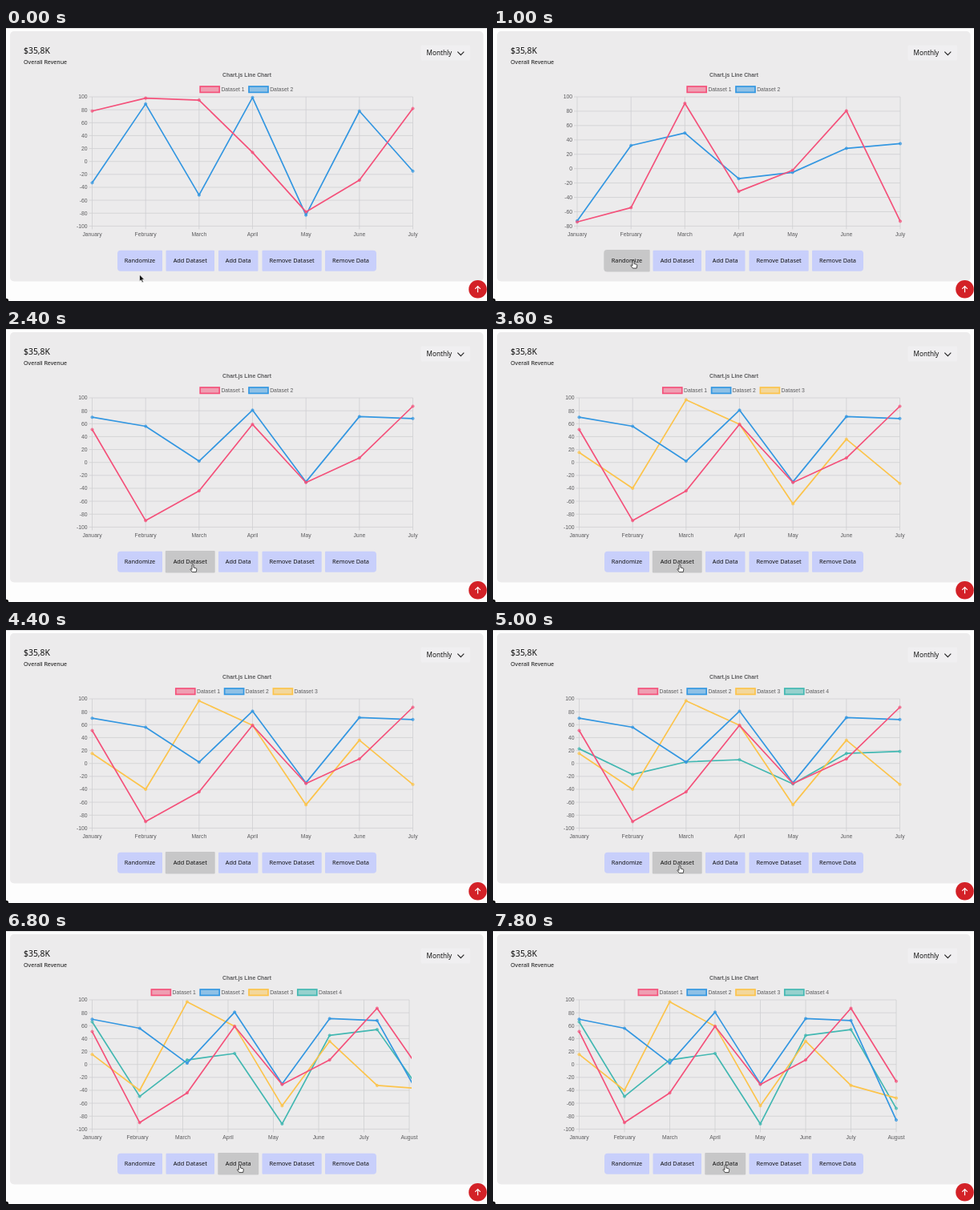
An HTML page for the animation above (8000 ms loop, 600 by 341 pixels).

```html
<!DOCTYPE html>
<html lang="en">
<head>
<meta charset="utf-8">
<title>Line chart</title>
<style>
  html, body { margin: 0; width: 100%; height: 100%; overflow: hidden; background: #fdfdfd; }
  svg { display: block; width: 100vw; height: 100vh; }
  .ui { font-family: "Noto Sans", "Open Sans", sans-serif; font-weight: 500; fill: #111; }
  .chart { font: 6.8px "Liberation Sans", Arial, sans-serif; fill: #5c5c5e; }
  .grid { stroke: #d0d0d2; stroke-width: .8; fill: none; }
  .buttons { font-size: 7.35px; text-anchor: middle; }
</style>
</head>
<body>
<svg viewBox="0 0 600 341">
  <clipPath id="area"><rect id="areaRect" y="83" height="167"/></clipPath>
  <rect width="600" height="341" fill="#fdfdfd"/>
  <rect width="600" height="1" fill="#dededf"/>
  <rect x="5" y="4" width="590.5" height="312.5" rx="5" fill="#ecebec"/>
  <g class="ui">
    <text x="22" y="32" font-size="10.4">$35,8K</text>
    <text x="22" y="45" font-size="7.1">Overall Revenue</text>
    <rect x="517.5" y="21.5" width="61.5" height="19" rx="2" fill="#f0eff1"/>
    <text x="524.5" y="34" font-size="8.2">Monthly</text>
    <path d="M563.3 29.6l4 4 4-4" fill="none" stroke="#222" stroke-width="1.1"/>
  </g>
  <g class="chart">
    <text x="300.5" y="60.5" font-weight="bold" text-anchor="middle">Chart.js Line Chart</text>
    <g id="chart"></g>
  </g>
  <g id="buttons" class="ui buttons"></g>
  <circle cx="588.5" cy="326.3" r="11.3" fill="#d32127"/>
  <path d="M588.5 330.3v-7.6M585.2 325.8l3.3-3.3 3.3 3.3" fill="none" stroke="#fff" stroke-width="1.2"/>
  <circle cx="0" cy="341" r="3.2" fill="#111"/>
  <g id="cursor" stroke-linejoin="round">
    <path id="arrow" d="M0 0V8.6L2 6.8 3.4 9.9 4.9 9.2 3.6 6.2H6.2Z" fill="#111" stroke="#fff" stroke-width=".7"/>
    <path id="hand" d="M-1 1a1 1 0 0 1 2 0V4l3 .8q1 .3 .8 1.4L4.2 9.6H-.6L-3.2 6.2Q-2.9 5-1 6.3Z" fill="#fff" stroke="#222" stroke-width=".8"/>
  </g>
</svg>
<script>
const LOOP = 8000, STEP = 200, TOP = 86, BOTTOM = 247.4;
const MONTHS = ["January", "February", "March", "April", "May", "June", "July", "August"];
const COLORS = ["#f4527b", "#3497e1", "#fcc44c", "#43b8b2"];
const $ = id => document.getElementById(id);

const pink = [51, -90, -44, 59, -31, 7, 87], blue = [70, 56, 2, 81, -30, 71, 68];
const yellow = [15.5, -40, 97, 59, -64, 36, -32.5], teal = [66, -49.5, 7, 17, -92, 45, 54];
const wide = { left: 107.5, right: 507.5, min: -100 };
const scenes = [
  { at: -LOOP, ...wide, sets: [[78, 98, 95, 14, -78, -29, 82], [-33, 89, -52, 99, -83, 78, -15]] },
  { at: 260, left: 105, right: 508, min: -80,
    sets: [[-75, -55, 91, -32, -2, 81, -74], [-73, 32, 50, -14.5, -5, 28, 35]] },
  { at: 1380, ...wide, sets: [pink, blue] },
  { at: 2560, ...wide, sets: [pink, blue, yellow] },
  { at: 4900, ...wide, sets: [pink, blue, yellow, teal] },
  { at: 6520, ...wide, right: 503,
    sets: [[...pink, -26], [...blue, -86], [...yellow, -52], [...teal, -68]] }
];

// time, x, y of the pointer tip
const track = [[0, 166.5, 308], [200, 171, 299], [400, 175, 290.5], [1700, 175, 290.5],
  [2200, 233, 294], [5000, 233, 294], [5600, 291, 292], [6800, 291.5, 292], [7800, 290, 292]];
const buttons = [["Randomize", 139, 195], ["Add Dataset", 199.5, 260], ["Add Data", 265, 314.5],
  ["Remove Dataset", 319.5, 393.7], ["Remove Data", 398, 462]];

const easeOutQuart = t => 1 - (1 - t) ** 4;
const mix = (a, b, t) => a + (b - a) * t;
const xAt = (s, i) => s.left + i * (s.right - s.left) / (s.sets[0].length - 1);
const yAt = (s, v) => TOP + (100 - v) * (BOTTOM - TOP) / (100 - s.min);

function pointAt(now, before, set, i, t) {
  const x = xAt(now, i), y = yAt(now, now.sets[set][i]);
  const old = before.sets[set];
  // new points rise from the zero line
  const fromX = old ? xAt(before, i) : x;
  const fromY = yAt(before, old?.[i] ?? 0);
  return [mix(fromX, x, t), mix(fromY, y, t)];
}

function drawGrid(s) {
  let lines = "", labels = "";
  for (let v = s.min; v <= 100; v += 20) {
    const y = yAt(s, v);
    lines += `M${s.left - 4} ${y}H${s.right}`;
    labels += `<text x="${s.left - 6}" y="${y + 2.4}" text-anchor="end">${v}</text>`;
  }
  s.sets[0].forEach((_, i) => {
    const x = xAt(s, i);
    lines += `M${x} ${TOP}V${BOTTOM + 4}`;
    labels += `<text x="${x}" y="260" text-anchor="middle">${MONTHS[i]}</text>`;
  });
  return `<path class="grid" d="${lines}"/>${labels}`;
}

function drawLegend(count) {
  return COLORS.slice(0, count).map((color, i) => {
    const x = 303 + (i - count / 2) * 60.8;
    return `<rect x="${x}" y="73" width="24" height="7.4" fill="${color}" fill-opacity=".5" stroke="${color}" stroke-width="1.7"/>
      <text x="${x + 26.2}" y="79.3">Dataset ${i + 1}</text>`;
  }).join("");
}

function drawSet(now, before, set, t) {
  const color = COLORS[set];
  const points = now.sets[set].map((_, i) => pointAt(now, before, set, i, t));
  const dots = points.filter(p => p[0] < now.right + 1).map(([x, y]) =>
    `<circle cx="${x}" cy="${y}" r="1.6" fill="${color}" fill-opacity=".6" stroke="${color}" stroke-width=".7"/>`);
  return `<polyline points="${points.join(" ")}" fill="none" stroke="${color}" stroke-width="1.7"
    stroke-linejoin="round" clip-path="url(#area)"/>${dots.join("")}`;
}

function drawChart(time) {
  const k = scenes.findLastIndex(s => s.at <= time);
  const now = scenes[k], before = scenes[Math.max(0, k - 1)];
  const t = easeOutQuart(Math.min(1, (time - now.at) / 1000));
  $("areaRect").setAttribute("x", now.left - 3);
  $("areaRect").setAttribute("width", now.right - now.left + 6);
  const sets = now.sets.map((_, i) => drawSet(now, before, i, t)).reverse();
  $("chart").innerHTML = drawGrid(now) + drawLegend(now.sets.length) + sets.join("");
}

function pointerAt(time) {
  const k = track.findLastIndex(p => p[0] <= time);
  const a = track[k], b = track[k + 1] ?? a;
  const t = b === a ? 0 : (time - a[0]) / (b[0] - a[0]);
  const ease = t * t * (3 - 2 * t);
  return [mix(a[1], b[1], ease), mix(a[2], b[2], ease)];
}

function buttonShape(i, l, r, grow) {
  const a = i === 0 ? 4 : 1, b = i === buttons.length - 1 ? 4 : 1;
  const top = 277.7 - grow, bottom = 303.8 + grow;
  l -= grow; r += grow;
  return `M${l + a} ${top}H${r - b}q${b} 0 ${b} ${b}V${bottom - b}q0 ${b} ${-b} ${b}H${l + a}q${-a} 0 ${-a} ${-a}V${top + a}q0 ${-a} ${a} ${-a}z`;
}

function drawControls(time) {
  const [x, y] = pointerAt(time);
  let over = false;
  $("buttons").innerHTML = buttons.map(([label, l, r], i) => {
    const hover = y < 304 && x >= l && x <= r;
    over ||= hover;
    return `<path d="${buttonShape(i, l, r, hover ? .7 : 0)}" fill="${hover ? "#c7c7c8" : "#c8cffb"}"/>
      <text x="${(l + r) / 2}" y="292.6">${label}</text>`;
  }).join("");
  const hidden = time >= 4000 && time < 4800;
  $("cursor").setAttribute("transform", `translate(${x} ${y})`);
  $("cursor").setAttribute("visibility", hidden ? "hidden" : "visible");
  $("hand").style.display = over ? "" : "none";
  $("arrow").style.display = over ? "none" : "";
}

const start = performance.now();
let shown = -1;
function tick() {
  const elapsed = (performance.now() - start + 1) % LOOP;
  const time = Math.floor(elapsed / STEP) * STEP;
  if (time !== shown) {
    shown = time;
    drawChart(time);
    drawControls(time);
  }
  requestAnimationFrame(tick);
}
tick();
</script>
</body>
</html>
```
